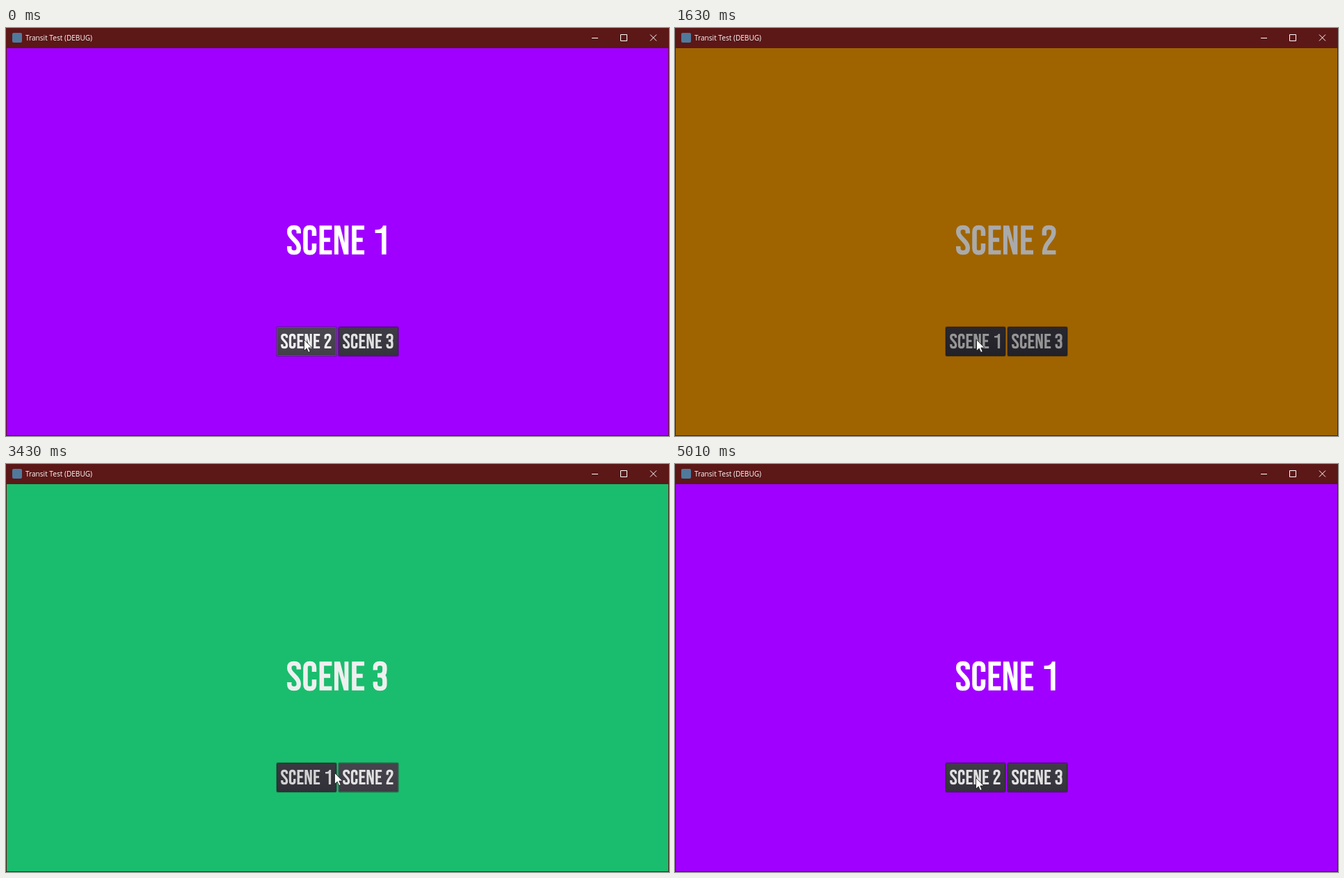
An HTML page with a canvas for the animation above (5.39 s loop, 953 px wide and 587 px high).

```html
<!DOCTYPE html>
<html lang="en">
<head>
<meta charset="utf-8">
<title>Transit Test (DEBUG)</title>
<style>
  html, body { margin: 0; width: 100%; height: 100%; overflow: hidden; background: #5c1717; }
  canvas { display: block; }
</style>
</head>
<body>
<canvas id="stage" width="953" height="587" role="img" aria-label="Scene switcher with fades"></canvas>
<script>
const ctx = document.getElementById('stage').getContext('2d');
const LOOP = 5390, FADE = 500, FIRST = 370, STEP = 45;

// Each visit to a scene: fade-in start, first mouse move, click time, clicked button.
const visits = [
  { from: -FADE, wake: 0, click: 810, target: 0, n: 1, links: [2, 3], bg: '#a000ff' },
  { from: 1297, wake: 1780, click: 2473, target: 1, n: 2, links: [1, 3], bg: '#ee9500' },
  { from: 2961, wake: 3200, click: 4010, target: 0, n: 3, links: [1, 2], bg: '#1cca74' },
  { from: 4494, wake: Infinity, click: Infinity, target: 0, n: 1, links: [2, 3], bg: '#a000ff' }
];

// time, x, y
const mousePath = [
  [0, 428, 448], [370, 429, 448], [415, 430, 448], [550, 430, 448], [780, 433, 448],
  [1760, 433, 448], [2420, 523, 450], [3200, 523, 450], [3430, 472, 444], [3960, 432, 451]
];

// Condensed capitals on a 1000-unit em, cap height 700, y down from the cap line.
const glyphs = {
  S: { adv: 374, w: 108, line: 'M299 188V142C299 76 262 45 186 45S72 76 72 142V165C72 300 299 375 299 528V558C299 624 262 655 186 655S72 624 72 558V500' },
  C: { adv: 386, w: 110, line: 'M299 248V150C299 80 270 45 194 45S89 80 89 150V550C89 620 118 655 194 655S299 620 299 550V436' },
  E: { adv: 360, fill: 'M41 0H341V100H151V295H302V395H151V600H341V700H41Z' },
  N: { adv: 425, fill: 'M41 0H179L286 419V0H384V700H271L139 222V700H41Z' },
  ' ': { adv: 170 },
  1: { adv: 395, fill: 'M264 0H342V700H232V180H72V102C190 102 238 82 264 0Z' },
  2: { adv: 395, w: 108, line: 'M77 242V142C77 76 114 45 190 45S304 76 304 142V170C304 340 82 410 82 650', fill: 'M28 600H356V700H28Z' },
  3: { adv: 395, w: 108, line: 'M77 208V142C77 76 114 45 190 45S304 76 304 142V205C304 285 268 332 190 332H130M190 332C268 332 304 380 304 460V558C304 624 266 655 190 655S77 624 77 558V490' }
};
for (const g of Object.values(glyphs)) {
  if (g.line) g.line = new Path2D(g.line);
  if (g.fill) g.fill = new Path2D(g.fill);
}

function lettering(text, x, base, size, color) {
  ctx.save();
  ctx.translate(x, base - size * 0.7);
  ctx.scale(size / 1000, size / 1000);
  ctx.fillStyle = ctx.strokeStyle = color;
  for (const ch of text) {
    const g = glyphs[ch];
    if (g.line) { ctx.lineWidth = g.w; ctx.stroke(g.line); }
    if (g.fill) ctx.fill(g.fill);
    ctx.translate(g.adv, 0);
  }
  ctx.restore();
}

function box(x, y, w, h, r, color, stroke) {
  ctx.beginPath();
  ctx.roundRect(x, y, w, h, r);
  if (stroke) { ctx.strokeStyle = color; ctx.lineWidth = 1; ctx.stroke(); }
  else { ctx.fillStyle = color; ctx.fill(); }
}

function button(x, label, hover, focus) {
  const y = 430;
  box(x - 1, y - 1, 88, 44, 3, 'rgba(0,0,0,.22)');
  const shade = ctx.createLinearGradient(0, y, 0, y + 42);
  shade.addColorStop(0, hover ? '#4b4852' : '#3e3c45');
  shade.addColorStop(1, hover ? '#423f49' : '#34323b');
  box(x, y, 86, 42, 2, shade);
  box(x + .5, y + .5, 85, 41, 2, hover ? '#57545e' : '#302e36', true);
  if (focus) box(x + 1, y + .5, 84.5, 41, 2, 'rgba(255,255,255,.35)', true);
  lettering(label, x + 5.6, 461, 30, hover ? '#f0f0f0' : '#e0e0e0');
}

function mouseAt(t) {
  const i = mousePath.findIndex(p => p[0] > t);
  if (i < 0) return mousePath[mousePath.length - 1].slice(1);
  const [a, b] = [mousePath[i - 1], mousePath[i]];
  const k = (t - a[0]) / (b[0] - a[0]);
  return [1, 2].map(j => Math.round(a[j] + (b[j] - a[j]) * k));
}

const arrow = new Path2D('M.5 .5V16.5L4.2 13L6.7 18.6L9.2 17.5L6.8 12H11.8Z');
function cursor(x, y) {
  ctx.save();
  ctx.translate(x, y);
  ctx.fillStyle = '#fff';
  ctx.strokeStyle = '#1a1a1a';
  ctx.lineWidth = .8;
  ctx.fill(arrow);
  ctx.stroke(arrow);
  ctx.restore();
}

function frame() {
  ctx.fillStyle = '#5c1717';
  ctx.fillRect(0, 0, 953, 587);
  box(9, 7, 14, 14, 2, '#4f7a9c');
  ctx.fillStyle = '#fff';
  ctx.font = '10.1px "Open Sans", "Noto Sans", sans-serif';
  ctx.fillText('Transit Test (DEBUG)', 28, 18);
  ctx.fillRect(842, 14, 9, 1);
  box(883.5, 9.5, 9, 9, 0, '#fff', true);
  ctx.beginPath();
  ctx.moveTo(926, 9.5); ctx.lineTo(935, 18.5);
  ctx.moveTo(935, 9.5); ctx.lineTo(926, 18.5);
  ctx.stroke();
}

function draw(t) {
  const v = visits.findLast(s => s.from <= t);
  const [mx, my] = mouseAt(t);
  const clicked = t >= v.click;
  const over = t >= v.wake && !clicked ? (mx >= 472 ? 1 : 0) : -1;

  frame();
  ctx.fillStyle = v.bg;
  ctx.fillRect(1, 29, 951, 557);
  lettering('SCENE ' + v.n, 403, 325.8, 59.4, '#fff');
  v.links.forEach((n, i) =>
    button(389 + i * 89, 'SCENE ' + n, over === i, clicked && v.target === i));

  const light = clicked ? 1 - (t - v.click) / FADE : (t - v.from) / FADE;
  const dark = 1 - Math.max(0, Math.min(1, light));
  ctx.fillStyle = `rgba(0,0,0,${dark})`;
  ctx.fillRect(1, 29, 951, 557);
  cursor(mx, my);
}

const start = performance.now();
function tick() {
  const t = (performance.now() - start) % LOOP;
  draw(t < FIRST ? 0 : FIRST + Math.floor((t - FIRST) / STEP) * STEP);
  requestAnimationFrame(tick);
}
tick();
</script>
</body>
</html>
```
